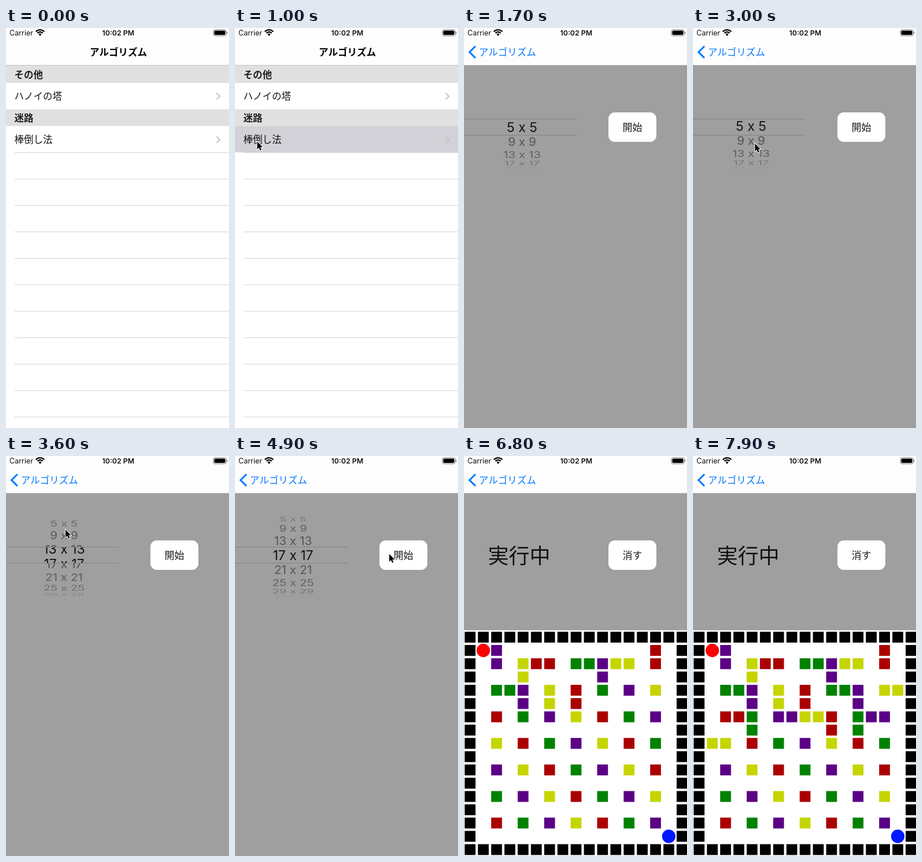
Animation of 386 by 692 pixels, one loop 8000 ms. Source, as an HTML page with a canvas:

```html
<!DOCTYPE html>
<html lang="ja">
<head>
<meta charset="utf-8">
<title>Maze demo</title>
<style>
  html, body { margin: 0; width: 100%; height: 100%; overflow: hidden; background: #fff; }
  canvas { display: block; width: 386px; height: 692px; }
</style>
</head>
<body>
<canvas id="stage"></canvas>
<script>
const W = 386, H = 692, LOOP = 8000, STEP = 100;
const LATIN = 'Inter, "Liberation Sans", sans-serif';
const JP = '"Noto Sans CJK JP", "Noto Sans CJK", sans-serif';
const BLUE = '#007aff', GRAY = '#9f9f9f';
const TITLE = 'アルゴリズム';

const canvas = document.getElementById('stage');
const ratio = window.devicePixelRatio || 1;
canvas.width = W * ratio;
canvas.height = H * ratio;
const c = canvas.getContext('2d');

const clamp01 = v => Math.max(0, Math.min(1, v));
const lerp = (a, b, p) => a + (b - a) * p;
const easeInOut = p => (1 - Math.cos(Math.PI * clamp01(p))) / 2;

function rect(x, y, w, h, color) {
  c.fillStyle = color;
  c.fillRect(x, y, w, h);
}

function polyline(points, color, width) {
  c.beginPath();
  points.forEach(([x, y]) => c.lineTo(x, y));
  c.strokeStyle = color;
  c.lineWidth = width;
  c.stroke();
}

function disc(x, y, r, color) {
  c.beginPath();
  c.arc(x, y, r, 0, Math.PI * 2);
  c.fillStyle = color;
  c.fill();
}

function roundRect(x, y, w, h, r) {
  c.beginPath();
  c.roundRect(x, y, w, h, r);
}

function label(text, x, y, font, color, align = 'left') {
  c.font = font;
  c.fillStyle = color;
  c.textAlign = align;
  c.fillText(text, x, y);
}

// Japanese text placed by the vertical centre of its em box
function japanese(text, x, cy, size, color, align = 'left', weight = 400) {
  label(text, x, cy + size * 0.38, `${weight} ${size}px ${JP}`, color, align);
}

function withAlpha(alpha, draw) {
  c.save();
  c.globalAlpha *= clamp01(alpha);
  draw();
  c.restore();
}

function drawStatusBar() {
  label('Carrier', 6, 13.3, `400 12.5px ${LATIN}`, '#111');
  label('10:02 PM', 194.3, 13.3, `600 12.3px ${LATIN}`, '#111', 'center');
  for (const r of [10, 6.3]) {
    c.beginPath();
    c.arc(59, 13.2, r, -Math.PI * 0.76, -Math.PI * 0.24);
    c.strokeStyle = '#000';
    c.lineWidth = 2.3;
    c.stroke();
  }
  c.beginPath();
  c.moveTo(59, 14);
  c.arc(59, 13.2, 3.4, -Math.PI * 0.76, -Math.PI * 0.24);
  c.fillStyle = '#000';
  c.fill();
  roundRect(358.8, 3, 22.4, 10.6, 3);
  c.strokeStyle = '#777';
  c.lineWidth = 1;
  c.stroke();
  roundRect(360.4, 4.6, 19.2, 7.4, 1.8);
  c.fillStyle = '#000';
  c.fill();
  rect(382, 6.5, 1.2, 3.6, '#777');
}

function drawNavBar(p) {
  rect(0, 0, W, 64, '#fdfdfd');
  rect(0, 64, W, 0.8, '#b4b4b4');
  drawStatusBar();
  const x = lerp(194.5, 75.2, p * (2 - p) * 0.06 + p * 0.94);
  withAlpha(1 - p, () => japanese(TITLE, x, 41.5, 16.5, '#000', 'center', 700));
  withAlpha(p, () => {
    japanese(TITLE, x, 41.5, 16.5, BLUE, 'center');
    polyline([[19.8, 31.5], [9.6, 41.7], [19.8, 51.9]], BLUE, 3);
  });
}

function drawSection(y, h, title) {
  rect(0, y, W, h, '#e0e0e0');
  japanese(title, 14.6, y + h / 2 + 1, 16.5, '#222', 'left', 700);
}

function drawItem(cy, title) {
  japanese(title, 14.6, cy, 16.5, '#111');
  polyline([[364.5, cy - 5.6], [370.2, cy], [364.5, cy + 5.6]], '#c2c2c6', 2);
}

function drawList(selected) {
  rect(0, 64, W, H - 63, '#fff');
  drawSection(65, 30, 'その他');
  drawItem(118, 'ハノイの塔');
  drawSection(140.5, 29, '迷路');
  if (selected) rect(0, 169.5, W, 45.7, '#d2d1d7');
  drawItem(193, '棒倒し法');
  for (let i = 0; i < 11; i++) rect(15, 215 + i * 45.75, W - 15, 1, '#d2d2d4');
}

const WHEEL = { x: 100.5, y: 172, radius: 71, angle: 0.36, top: 157.5, bottom: 185.5 };

function drawWheelRows(position, size, shade) {
  for (let i = 0; i < 9; i++) {
    const angle = (i - position) * WHEEL.angle;
    if (Math.abs(angle) > 1.5) continue;
    const depth = Math.cos(angle), n = 5 + 4 * i;
    c.save();
    c.translate(WHEEL.x, WHEEL.y + WHEEL.radius * Math.sin(angle));
    c.scale(0.95 + 0.05 * depth, depth);
    c.globalAlpha *= shade(depth);
    label(`${n} x ${n}`, 0, size * 0.364, `400 ${size}px ${LATIN}`, '#000', 'center');
    c.restore();
  }
}

function clipped(bands, draw) {
  c.save();
  c.beginPath();
  bands.forEach(([top, bottom]) => c.rect(0, top, 194, bottom - top));
  c.clip();
  draw();
  c.restore();
}

function drawWheel(position) {
  const { top, bottom } = WHEEL;
  clipped([[90, top], [bottom, 255]],
    () => drawWheelRows(position, 20.8, d => 0.5 * d ** 0.9));
  clipped([[top, bottom]], () => drawWheelRows(position, 23, () => 0.88));
  for (const y of [top, bottom]) rect(0, y - 0.5, 194.5, 1, '#858585');
}

function drawButton(text, pressed) {
  roundRect(250, 146, 83, 51, 11);
  c.fillStyle = '#fff';
  c.fill();
  withAlpha(pressed ? 0.25 : 1, () => japanese(text, 291.5, 172, 17, '#1c1c1c', 'center'));
}

const COLORS = ['#5b0085', '#c5d500', '#ab0000', '#008200'];
const SHIFT = { U: [0, -1], D: [0, 1], L: [-1, 0], R: [1, 0] };
const FALLS = 'UDLRDLR'.slice(0, 6) + 'U' + 'RDDDRDR' + 'RDRRDDL' + 'L';
const cellX = i => 10.5 + i * 22.93;
const cellY = j => 313.4 + j * 22.97;

function drawCell(i, j, color) {
  rect(cellX(i) - 9.3, cellY(j) - 9.4, 18.7, 18.8, color);
}

function drawMaze(fallen) {
  rect(0, 301.5, W, H - 301.5, '#fff');
  for (let i = 0; i < 17; i++) {
    drawCell(i, 0, '#000');
    drawCell(i, 16, '#000');
    if (i % 16) {
      drawCell(0, i, '#000');
      drawCell(16, i, '#000');
    }
  }
  for (let n = 0; n < 49; n++) {
    const i = 2 + 2 * (n % 7), j = 2 + 2 * Math.floor(n / 7), color = COLORS[n % 4];
    drawCell(i, j, color);
    if (n < fallen && n < FALLS.length) {
      const [dx, dy] = SHIFT[FALLS[n]];
      drawCell(i + dx, j + dy, color);
    }
  }
  disc(cellX(1), cellY(1), 11.6, '#f00');
  disc(cellX(15), cellY(15), 11.6, '#0018ff');
}

function drawDetail(t) {
  rect(0, 64.8, W, H - 64, GRAY);
  if (t < 5700) {
    drawWheel(wheelPosition(t));
    drawButton('開始', t >= 5500);
  } else {
    japanese('実行中', 95.5, 172.5, 36, '#111', 'center');
    drawButton('消す', false);
    drawMaze(Math.floor((t - 5700) / STEP));
  }
}

const dragProgress = t => easeInOut((t - 2900) / 900);

function wheelPosition(t) {
  const snap = 1 - (1 - clamp01((t - 4100) / 400)) ** 2;
  return 2.75 * dragProgress(t) + 0.25 * snap;
}

const PATH = [
  [500, 28, 204], [600, 38, 196], [1400, 38, 196], [1700, -12, 192],
  [1900, -12, 190], [2000, 2, 190], [2100, 37, 190], [2200, 37, 190],
  [2700, 107, 202], [2900, 107, 202], [3800, 102, 117], [4300, 102, 117],
  [4700, 209, 178], [4800, 209, 178], [4900, 266.5, 169], [5100, 275, 168.5],
  [6400, 275, 168.5]
];

function cursorAt(t) {
  if (t >= 2900 && t <= 3800) {
    const p = dragProgress(t);
    return [lerp(107, 102, p), lerp(202, 117, p)];
  }
  const next = PATH.findIndex(key => key[0] > t);
  if (next < 1) return null;
  const a = PATH[next - 1], b = PATH[next];
  const p = (t - a[0]) / (b[0] - a[0]);
  return [lerp(a[1], b[1], p), lerp(a[2], b[2], p)];
}

function drawCursor(t) {
  const at = cursorAt(t);
  if (!at) return;
  c.save();
  c.translate(at[0] + 0.5, at[1] + 0.5);
  c.beginPath();
  [[0, 0], [0, 13.3], [3, 10.6], [5, 15.3], [7.3, 14.3], [5.3, 9.8], [9.3, 9.6]]
    .forEach(([x, y]) => c.lineTo(x, y));
  c.closePath();
  c.strokeStyle = '#fff';
  c.lineWidth = 1.8;
  c.stroke();
  c.fillStyle = '#000';
  c.fill();
  c.restore();
}

// Critically damped spring for the screen push
function pushProgress(t) {
  const s = Math.max(0, t - 1053) / 1000 * 18.26;
  return t >= 1600 ? 1 : 1 - (1 + s) * Math.exp(-s);
}

function draw(t) {
  c.setTransform(ratio, 0, 0, ratio, 0, 0);
  c.lineCap = 'butt';
  c.lineJoin = 'miter';
  const p = pushProgress(t);
  if (p < 1) {
    c.save();
    c.translate(-116 * p, p > 0 ? -1 : 0);
    drawList(t >= 1000);
    c.restore();
    rect(0, 64, W, H - 64, `rgba(0,0,0,${0.13 * p})`);
  }
  if (p > 0) {
    c.save();
    c.translate(W * (1 - p), 0);
    drawDetail(t);
    c.restore();
  }
  drawNavBar(p);
  drawCursor(t);
}

const start = performance.now();
function tick() {
  const t = (performance.now() - start) % LOOP;
  draw(Math.floor(t / STEP) * STEP);
  requestAnimationFrame(tick);
}
tick();
</script>
</body>
</html>
```
